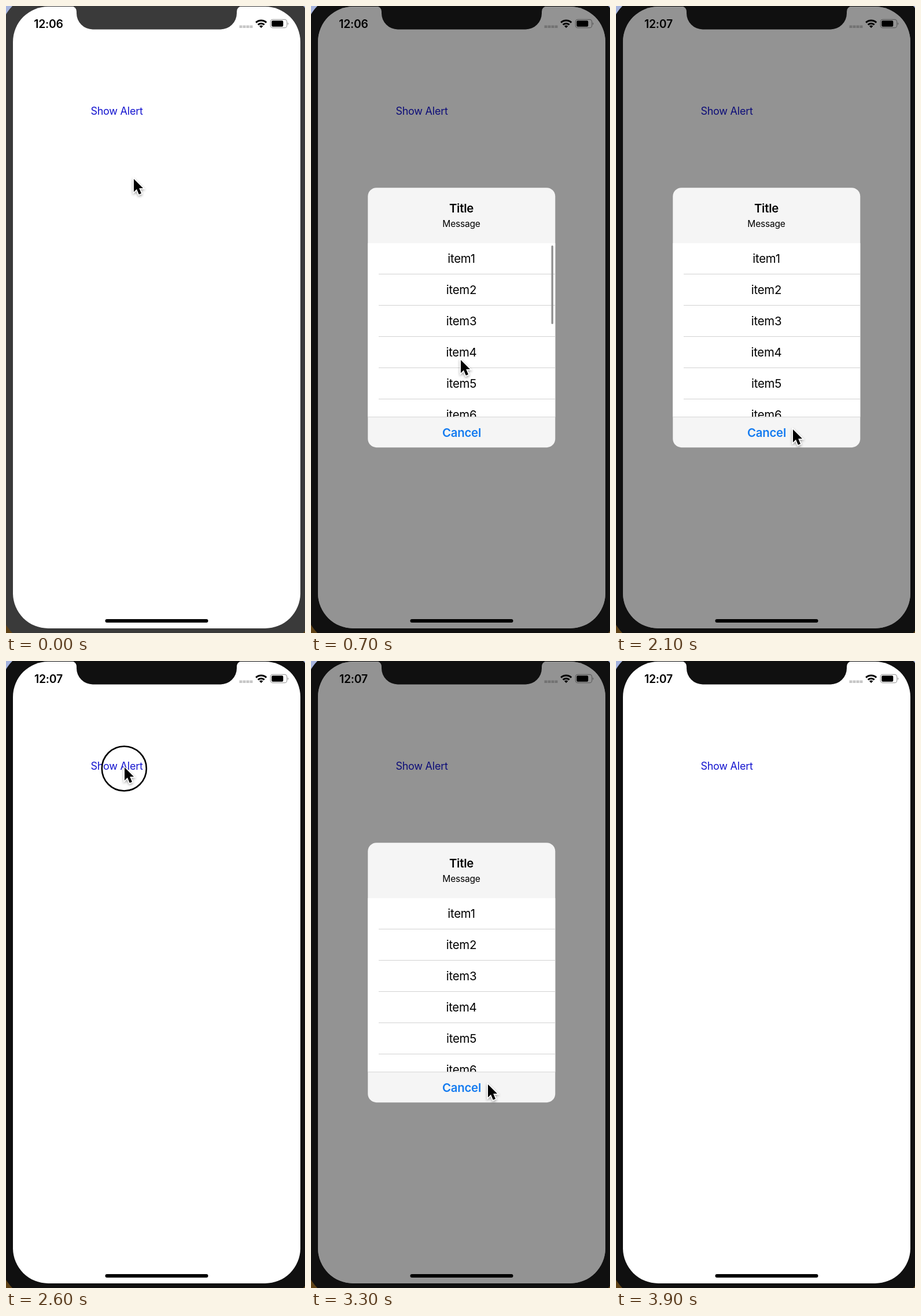
Write an HTML page that moves like this. It is 517 by 1084 pixels and loops after 4000 ms.

```html
<!DOCTYPE html>
<html lang="en">
<head>
<meta charset="utf-8">
<title>Alert with a scrolling list</title>
<style>
html, body { margin: 0; width: 100%; height: 100%; overflow: hidden; }
svg { display: block; width: 517px; height: 1084px; }
text { font: 20.4px Inter, sans-serif; letter-spacing: -.25px; text-anchor: middle; }
.bold { font-weight: 600; }
</style>
</head>
<body>
<svg viewBox="0 0 517 1084">
  <defs>
    <linearGradient id="desktop" x2="0" y2="1">
      <stop offset=".4" stop-color="#a6b4de"/>
      <stop offset=".6" stop-color="#5f4216"/>
    </linearGradient>
    <clipPath id="card"><rect x="98.3" y="314.2" width="324" height="449" rx="15"/></clipPath>
    <clipPath id="list"><rect x="98" y="410" width="325" height="300"/></clipPath>
    <filter id="shadow" x="-50%" y="-50%" width="200%" height="200%">
      <feDropShadow dx="0" dy="2" stdDeviation="2" flood-opacity=".4"/>
    </filter>
  </defs>

  <rect width="517" height="1084" fill="url(#desktop)"/>
  <g id="bezel">
    <rect x="-10" y="-21" width="545" height="1126" rx="72"/>
    <rect x="12" y="1" width="497" height="1075" rx="61" fill="#fff"/>
  </g>

  <text id="clock" class="bold" x="73.5" y="38" style="font-size:19.4px"></text>
  <path d="M403.5 35.8H427" stroke="#c6c6c6" stroke-width="4.5" stroke-dasharray="5 1"/>
  <g fill="none" stroke="#000" stroke-width="3">
    <path d="M432.2 28.6a12.8 12.8 0 0 1 18 0M435.7 32.4a7.8 7.8 0 0 1 11 0"/>
    <path d="M441.2 38l-3.2-3.2a4.6 4.6 0 0 1 6.4 0z" fill="#000" stroke="none"/>
  </g>
  <rect x="457.3" y="23.3" width="28.4" height="14.4" rx="4" fill="none" stroke="#a2a2a2" stroke-width="1.2"/>
  <rect x="459.3" y="25.3" width="20" height="10.4" rx="2"/>
  <path d="M487 28.2q3 2.3 0 4.6z" fill="#a2a2a2"/>
  <text x="191.5" y="187.5" fill="#1414cf" style="font-size:18px">Show Alert</text>

  <rect id="dim" x="12" y="1" width="497" height="1075" rx="61"/>
  <path id="notch" d="M112 0Q122 1 122 10V12.5A28 28 0 0 0 150 40.5H371A28 28 0 0 0 399 12.5V10Q399 1 409 0Z"/>
  <rect x="171.5" y="1060" width="178" height="6" rx="3"/>

  <g id="alert" clip-path="url(#card)">
    <rect x="98" y="314" width="325" height="450" fill="#f5f5f5"/>
    <text class="bold" x="260" y="357.3">Title</text>
    <text x="260" y="381.6" style="font-size:15.6px">Message</text>
    <g clip-path="url(#list)">
      <rect x="98" y="409" width="325" height="302" fill="#fff"/>
      <g id="rows"></g>
      <rect id="bar" x="415.5" y="414" width="3.4" height="136" rx="1.7" fill="#929292"/>
    </g>
    <path d="M98 710.5H423" stroke="#d6d6d6"/>
    <text class="bold" x="260.5" y="744.5" fill="#147bf0">Cancel</text>
  </g>

  <g id="cursor">
    <circle id="press" cx="-.7" cy="2" r="38.5" fill="none" stroke="#000" stroke-width="2.6"/>
    <path d="M0 0V22.5L5 17.6L8.8 26.8L13 25L9.2 16H16Z"
      stroke="#fff" stroke-width="3" paint-order="stroke" filter="url(#shadow)"/>
  </g>
</svg>
<script>
const LOOP = 4000, STEP = 100, PAUSE = 200, ROW = 54, ITEMS = 12;
const $ = id => document.getElementById(id);
const ramp = (t, start, length) => Math.min(1, Math.max(0, (t - start) / length));
const smooth = k => k * k * (3 - 2 * k);
const set = (id, attributes) => {
  for (const name in attributes) $(id).setAttribute(name, attributes[name]);
};

const button = { x: 205, y: 184 }, cancel = { x: 306, y: 732 };
const firstOpen = 300, firstClose = 2000, secondOpen = 2600, secondClose = 3200;

// The pointer reaches each stop at its time and rests there for PAUSE.
const stops = [
  { time: -PAUSE, x: 221, y: 299 },
  { time: firstOpen, ...button, tap: true },
  { time: 700, x: 259, y: 612 },
  { time: 1100, x: 285, y: 450, drag: true },
  { time: 1600, x: 299, y: 663, drag: true },
  { time: firstClose, ...cancel, tap: true },
  { time: secondOpen, ...button, tap: true },
  { time: secondClose, ...cancel, tap: true }
];

$('rows').innerHTML = Array.from({ length: ITEMS }, (_, i) => {
  const top = 409.5 + i * ROW;
  return `<text x="260" y="${top + 34}">item${i + 1}</text>
    <path d="M117 ${top + ROW}H423" stroke="#d2d2d2"/>`;
}).join('');

function pointerAt(t) {
  const last = stops.findLast(stop => stop.time <= t);
  const next = stops[stops.indexOf(last) + 1] || last;
  const leave = last.time + PAUSE;
  const k = next === last ? 0 : smooth(ramp(t, leave, next.time - leave));
  return {
    x: last.x + (next.x - last.x) * k,
    y: last.y + (next.y - last.y) * k,
    pressed: (last.tap || last.drag) && t < last.time + 100 || next.drag && t >= leave
  };
}

function draw(t) {
  const [open, close] = t < secondOpen ? [firstOpen, firstClose] : [secondOpen, secondClose];
  const shown = ramp(t, open, 200);
  const level = shown * (1 - ramp(t, close + 100, 240));
  const bar = ramp(t, open + 200, 100) * (1 - ramp(t, close, 100));
  const offset = 248.6 * Math.sin(Math.PI * ramp(t, 800, 1100)) ** 2;
  const { x, y, pressed } = pointerAt(t);
  const bezel = t < firstOpen ? '#3a3a3a' : '#101010';

  set('bezel', { fill: bezel });
  set('notch', { fill: bezel });
  $('clock').textContent = t < firstClose ? '12:06' : '12:07';
  set('dim', { opacity: .423 * level });
  set('alert', {
    opacity: level ** 2,
    transform: `translate(260 538.5) scale(${1.1 - .1 * shown}) translate(-260 -538.5)`
  });
  set('rows', { transform: `translate(0 ${-offset})` });
  set('bar', { opacity: bar, transform: `translate(0 ${offset * 294 / (ROW * ITEMS)})` });
  set('cursor', {
    transform: `translate(${x} ${y})`,
    visibility: t < 3700 ? 'visible' : 'hidden'
  });
  set('press', { opacity: pressed ? 1 : 0 });
}

function tick() {
  draw(Math.floor(performance.now() % LOOP / STEP) * STEP);
  requestAnimationFrame(tick);
}
tick();
</script>
</body>
</html>
```
